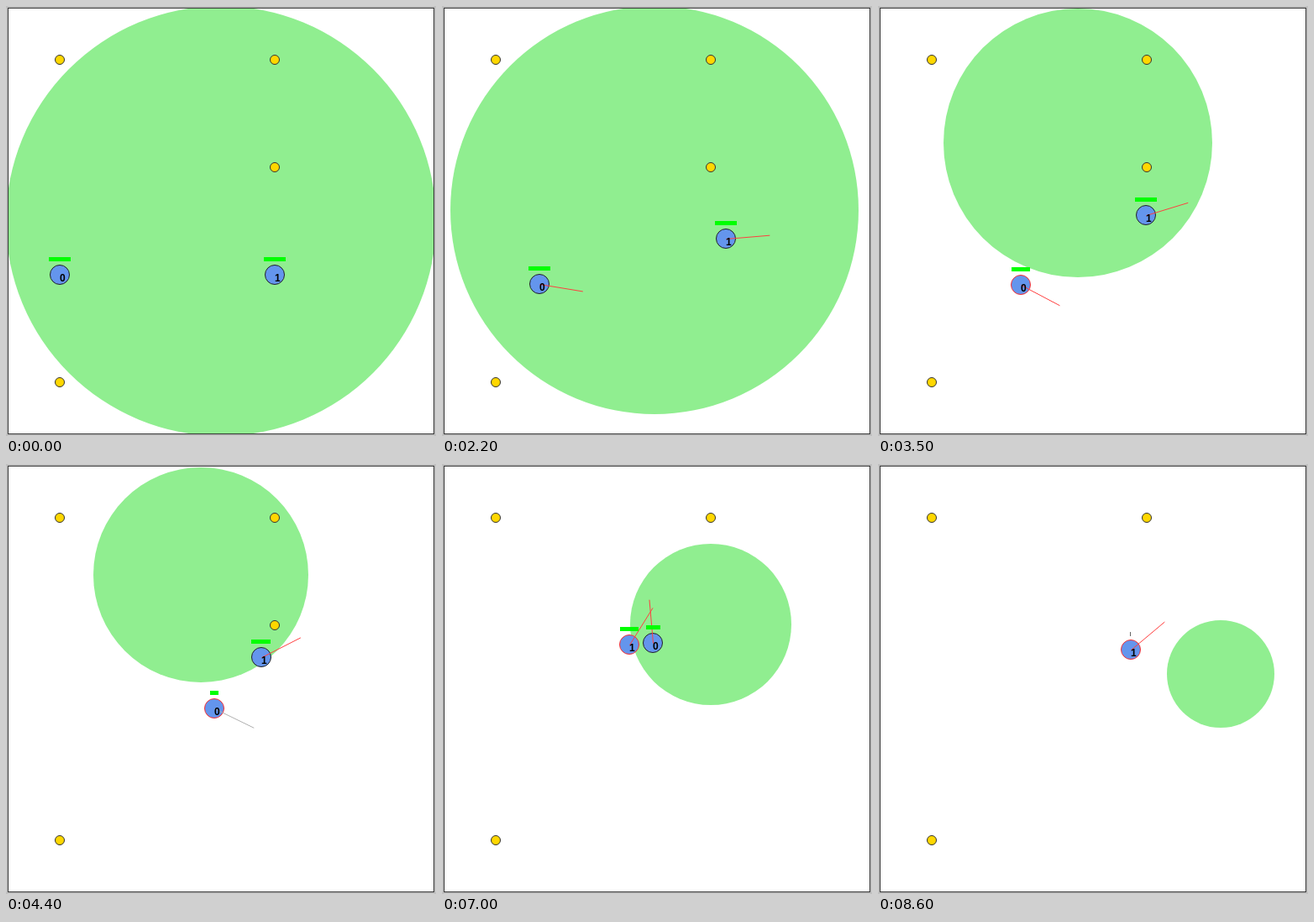
Recreate the animation shown at these times as an HTML page with a canvas. Size 512x512 px, loop 8700 ms.

```html
<!DOCTYPE html>
<html lang="en">
<head>
<meta charset="utf-8">
<title>Shrinking zone</title>
<style>
html, body { margin: 0; width: 100%; height: 100%; overflow: hidden; background: #fff; }
canvas { display: block; width: 512px; height: 512px; }
</style>
</head>
<body>
<canvas id="stage" width="512" height="512"></canvas>
<script>
const ctx = document.getElementById('stage').getContext('2d');
const TICK = 100, TICKS = 87;
const FULL_HEALTH = 20, BAR_UNIT = 1.28, SIGHT = 52;
const PICKUP_TICK = 55;
const coins = [[64, 64], [320, 64], [64, 448], [320, 192]];

// Both agents pass their waypoints (x, y, heading in degrees) at these ticks
const turns = [0, 14, 28, 36, 44, 54, 61, 70, 86];
const paths = [
  [[64, 320, 0], [114, 332, 7], [122, 329, 13], [178, 330, 29], [248, 291, 26],
   [304, 209, -72], [276, 180, -78], [251, 213, -95], [241, 250, -86]],
  [[320, 320, 5], [344, 296, 1], [330, 263, -10], [317, 247, -18], [304, 230, -27],
   [282, 214, -45], [233, 214, -61], [223, 215, -58], [301, 221, -40]]
];

const clamp = (v, lo, hi) => Math.max(lo, Math.min(hi, v));
const mix = (a, b, f) => a + (b - a) * f;

// Cubic Hermite curve through the waypoints
function pose(path, tick) {
  const last = turns.length - 1;
  const i = clamp(turns.findIndex(t => t > tick) - 1, 0, last - 1);
  const k = tick >= turns[last] ? last - 1 : i;
  const span = turns[k + 1] - turns[k], u = (tick - turns[k]) / span;
  const slope = (n, c) => {
    const p = clamp(n - 1, 0, last), q = clamp(n + 1, 0, last);
    return (path[q][c] - path[p][c]) / (turns[q] - turns[p]);
  };
  const [x, y, heading] = [0, 1, 2].map(c =>
    mix(path[k][c], path[k + 1][c], u * u * (3 - 2 * u)) +
    span * u * (1 - u) * (slope(k, c) * (1 - u) - slope(k + 1, c) * u));
  return { x: Math.round(x), y: Math.round(y), heading: heading * Math.PI / 180 };
}

function zoneAt(tick) {
  const first = clamp((tick - 20) / 20, 0, 1), second = clamp((tick - 60) / 20, 0, 1);
  return {
    x: mix(mix(256, 232, first), 408, second),
    y: mix(mix(256, 132, first), 250, second),
    r: mix(mix(256, 128, first), 64, second)
  };
}

// Agents lose one health point per tick spent outside the zone
const health = [FULL_HEALTH, FULL_HEALTH];
const history = Array.from({ length: TICKS }, (_, tick) => {
  const zone = zoneAt(tick);
  const agents = paths.map((path, id) => {
    const agent = pose(path, tick);
    agent.outside = Math.hypot(agent.x - zone.x, agent.y - zone.y) > zone.r;
    if (agent.outside) health[id]--;
    if (id === 0 && tick === PICKUP_TICK) health[id] += FULL_HEALTH / 2;
    agent.health = health[id];
    return agent;
  });
  return { zone, agents };
});

function disc(x, y, r, fill, outline) {
  ctx.beginPath();
  ctx.arc(x, y, r, 0, 2 * Math.PI);
  ctx.fillStyle = fill;
  ctx.fill();
  if (outline) {
    ctx.strokeStyle = outline;
    ctx.stroke();
  }
}

function ray(agent, length, color) {
  ctx.beginPath();
  ctx.moveTo(agent.x + 0.5, agent.y + 0.5);
  ctx.lineTo(agent.x + 0.5 + Math.cos(agent.heading) * length,
             agent.y + 0.5 + Math.sin(agent.heading) * length);
  ctx.strokeStyle = color;
  ctx.stroke();
}

function drawAgent(agent, id, tick) {
  const { x, y } = agent;
  disc(x, y, 11.5, '#6495ed', agent.outside ? '#ff3030' : '#222');
  if (tick > 0) {
    const early = tick < 20;
    const calm = early || (id === 0 && tick >= 37 && tick < 50);
    ray(agent, SIGHT, calm ? '#b0b0b0' : '#ff4040');
    if (id === 1 && early) ray(agent, SIGHT / 2, '#ff4040');
  }
  const width = agent.health * BAR_UNIT;
  ctx.fillStyle = agent.health > 1 ? '#0f0' : '#666';
  ctx.fillRect(Math.round(x - width / 2), y - 21, Math.round(width), 5);
  ctx.fillStyle = '#000';
  ctx.fillText(id, x, y + 8);
}

function drawBorder() {
  ctx.lineWidth = 2;
  ctx.strokeStyle = '#c0c0c0';
  ctx.strokeRect(1, 1, 510, 510);
  ctx.lineWidth = 1;
  ctx.strokeStyle = '#333';
  ctx.strokeRect(2.5, 2.5, 507, 507);
}

function draw(tick) {
  const { zone, agents } = history[tick];
  ctx.fillStyle = '#fff';
  ctx.fillRect(0, 0, 512, 512);
  ctx.font = 'bold 12px "Liberation Sans", sans-serif';
  disc(Math.floor(zone.x), Math.floor(zone.y), Math.floor(zone.r), '#90ee90');
  drawBorder();
  coins.forEach(([x, y], i) => {
    if (i < 3 || tick < PICKUP_TICK) disc(x, y, 5.5, '#ffd700', '#333');
  });
  agents.forEach((agent, id) => {
    if (agent.health > 0) drawAgent(agent, id, tick);
  });
}

const start = performance.now();
function frame() {
  draw(Math.floor((performance.now() - start) / TICK) % TICKS);
  requestAnimationFrame(frame);
}
frame();
</script>
</body>
</html>
```
